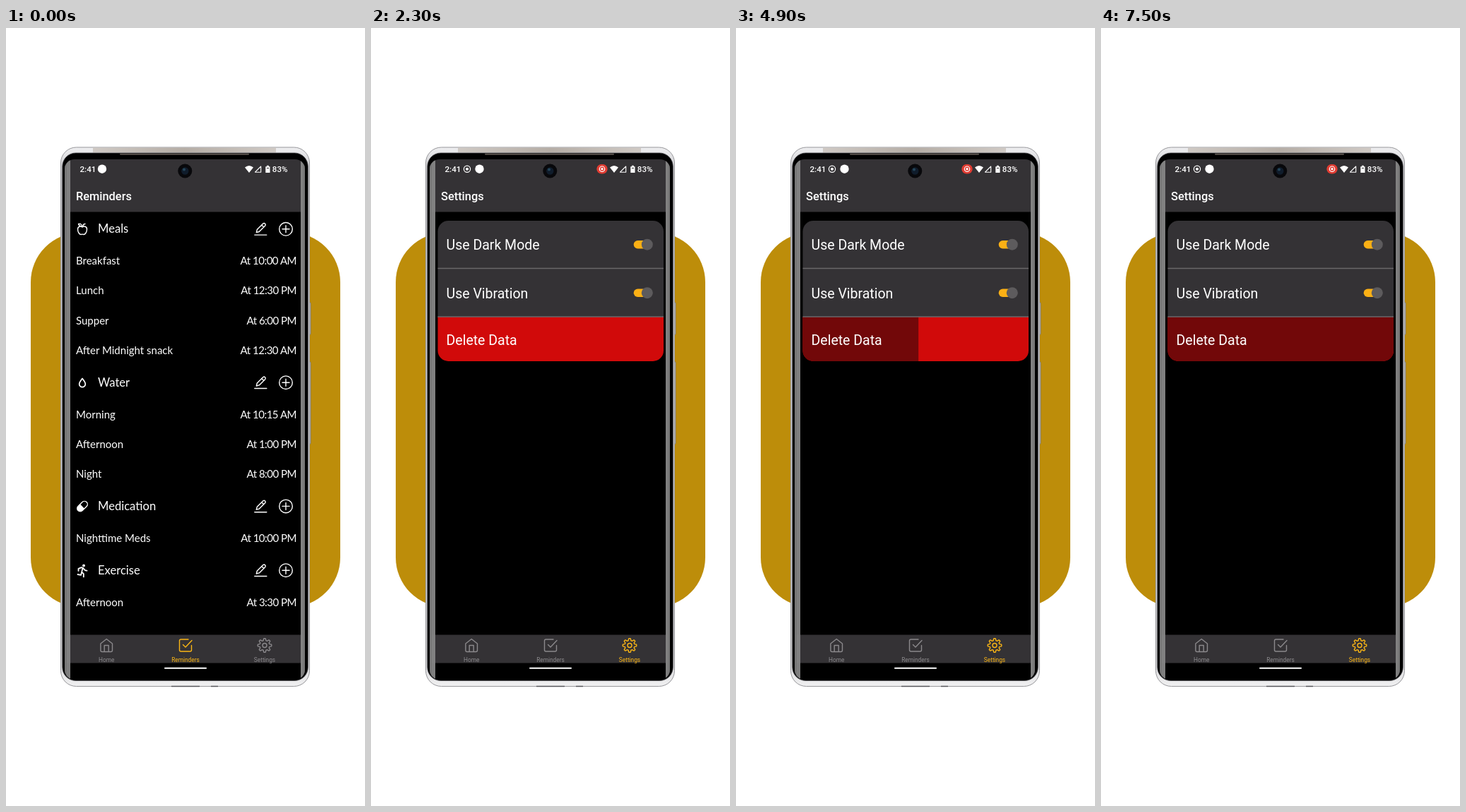
Recreate the animation shown at these times as an HTML page. Size 508 by 1102 pixels, loop 8000 ms.

```html
<!DOCTYPE html>
<html lang="en">
<head>
<meta charset="utf-8">
<title>Reminders app</title>
<style>
  html, body { margin: 0; width: 100%; height: 100%; overflow: hidden; background: #fff; }
  svg { display: block; width: 100%; height: 100%; }
  text { fill: #fff; }
  .list { font-family: Lato, sans-serif; font-size: 15px; }
  .list .head { font-size: 16.6px; }
  .list .time { text-anchor: end; letter-spacing: -.5px; }
  .status, .title, .rows, .tab { font-family: Roboto, sans-serif; }
  .status { font-size: 11.6px; font-weight: 500; }
  .title { font-size: 16.4px; font-weight: 500; }
  .rows { font-size: 19.5px; }
  .tab text { font-size: 8.3px; text-anchor: middle; fill: var(--tint); }
  .tab path, .tab circle { stroke: var(--tint); }
  .tab { --tint: #8b898c; }
  .tab.on { --tint: #fbb615; }
  .line { fill: none; stroke: #fff; stroke-width: 1.4; stroke-linecap: round; stroke-linejoin: round; }
  #reminders, #settings, #hold { animation: 8s step-end -5ms infinite; }
  #reminders { animation-name: leave; }
  #settings { animation-name: enter; }
  #hold { animation-name: fill; animation-timing-function: linear; }
  @keyframes leave { 0% { opacity: 1 } 16.25%, 100% { opacity: 0 } }
  @keyframes enter { 0% { opacity: 0 } 16.25%, 100% { opacity: 1 } }
  @keyframes fill {
    0% { transform: translateX(-323px); }
    37.5% { transform: translateX(-323px); animation-timing-function: steps(37, end); }
    83.75%, 100% { transform: translateX(2.6px); }
  }
</style>
</head>
<body>
<svg viewBox="0 0 508 1102">
  <defs>
    <linearGradient id="metal" x2="0" y2="1">
      <stop offset="0" stop-color="#eeeef0"/><stop offset=".05" stop-color="#c9c9cc"/>
      <stop offset=".94" stop-color="#d2d2d4"/><stop offset="1" stop-color="#f0f0f1"/>
    </linearGradient>
    <linearGradient id="band">
      <stop offset="0" stop-color="#cfc9c4"/><stop offset=".5" stop-color="#b5ada5"/><stop offset="1" stop-color="#cfc9c4"/>
    </linearGradient>
    <clipPath id="glass"><rect x="83" y="186" width="340" height="737" rx="14"/></clipPath>
    <clipPath id="card"><rect x="94.5" y="273" width="319.5" height="199" rx="15"/></clipPath>
  </defs>

  <rect x="35" y="290" width="438" height="530" rx="70" fill="#bd8d0a"/>

  <g fill="#c8c8cb" stroke="#77777a" stroke-width=".8">
    <rect x="426" y="388.500" width="5" height="46" rx="1.500"/>
    <rect x="426" y="472.500" width="5" height="117" rx="1.500"/>
  </g>
  <rect x="77.500" y="169" width="352" height="763.500" rx="22" fill="url(#metal)" stroke="#97979b"/>
  <rect x="123" y="169.500" width="259" height="7" fill="url(#band)"/>
  <path d="M234 932.500H274M290 932.500H300" stroke="#55555a" stroke-width="1.500"/>
  <rect x="79.800" y="177" width="347.500" height="747.500" rx="19" fill="#000" stroke="#4b4b4e" stroke-width=".8"/>
  <path d="M162 178.700H343" stroke="#5c5550" stroke-width="2" stroke-linecap="round"/>

  <g clip-path="url(#glass)">
    <rect x="83" y="186" width="340" height="74.500" fill="#343235"/>
    <rect x="83" y="859.500" width="340" height="40" fill="#343235"/>
  </g>
  <g id="reminders"></g>
  <g id="settings"></g>

  <g clip-path="url(#glass)" fill="#858585">
    <path d="M83 186H91V923H83ZM417 186H423V923H417Z" opacity=".96"/>
    <path d="M83 186H86V923H83ZM420.500 186H423V923H420.500Z" fill="#6f6f6f" opacity=".5"/>
  </g>
  <path d="M225 906.800H283" stroke="#fff" stroke-width="2" stroke-linecap="round"/>
  <circle cx="253.300" cy="202.500" r="10" fill="#08080b"/>
  <circle cx="253.300" cy="202.500" r="5.200" fill="#101c2b"/>
  <circle cx="252" cy="200.500" r="2" fill="#25465a"/>
</svg>

<script>
const text = (x, y, words, cls = '') => `<text x="${x}" y="${y}" class="${cls}">${words}</text>`;
const line = (d, extra = '') => `<path class="line" d="${d}" ${extra}/>`;
const at = (x, y, body) => `<g transform="translate(${x} ${y})">${body}</g>`;
const target = (x, y, r) => `<circle cx="${x}" cy="${y}" r="${r}" class="line" style="stroke-width:1.2"/>
  <circle cx="${x}" cy="${y}" r="${r * .45}" fill="#fff"/>`;

function statusBar(recording) {
  const dot = recording ? 153.5 : 136;
  return `<g class="status">${text(104.500, 203.500, '2:41')}${text(376.800, 203.500, '83%')}</g>
    ${recording ? target(136, 199.700, 4.600) +
      `<rect x="319.300" y="193" width="15.400" height="13.400" rx="6.700" fill="#e03c32"/>` + target(327, 199.700, 3.700) : ''}
    <circle cx="${dot}" cy="199.700" r="6.200" fill="#fff"/>
    <path fill="#fff" d="M338 197.500Q344 192.500 350 197.500L344 205ZM367.300 196.200H369V194.800H371.800V196.200H373.500V205H367.300Z"/>
    ${line('M352.500 204.200H360.700V196Z', 'style="stroke-width:1.1"')}
    <path d="M369 198.500H372" stroke="#343235"/>`;
}

// Eight rounded teeth around a ring
function gear() {
  const points = Array.from({ length: 97 }, (_, i) => {
    const a = i / 96 * 2 * Math.PI;
    const r = 8.4 + 1.4 * Math.max(-1, Math.min(1, 1.8 * Math.cos(8 * a)));
    return `${(r * Math.cos(a)).toFixed(2)} ${(r * Math.sin(a)).toFixed(2)}`;
  });
  return line(`M${points.join('L')}Z`) + '<circle class="line" r="3"/>';
}

const tabs = [
  ['Home', 142.2, line('M-8.300 -2.500L0 -9L8.300 -2.500V7Q8.300 9 6.300 9H-6.300Q-8.300 9 -8.300 7ZM-3 9V0H3V9')],
  ['Reminders', 254, line('M8.500 0V6.500Q8.500 8.500 6.500 8.500H-6.500Q-8.500 8.500 -8.500 6.500V-6.500Q-8.500 -8.500 -6.500 -8.500H4M-3.500 -1L0 2.500L9 -7')],
  ['Settings', 366, gear()]
];
const navBar = active => tabs.map(([name, x, icon]) =>
  `<g class="tab ${name === active ? 'on' : ''}">${at(x, 874.500, icon)}${text(x, 897.600, name)}</g>`).join('');

const page = (name, recording, body) =>
  statusBar(recording) + text(99, 244, name, 'title') + body + navBar(name);

const apple = line('M0 -3C-2.500 -5 -6.500 -4 -6.500 0C-6.500 4 -4 7.500 -2 7.500Q0 6.700 2 7.500C4 7.500 6.500 4 6.500 0C6.500 -4 2.500 -5 0 -3Q0 -6 -2.500 -7.500H-5.500Q-5 -4.500 -2 -4.500M1 -5Q1.500 -7.500 4 -7.500');
const drop = line('M0 -6C2 -3 4.300 -.5 4.300 2A4.300 4.300 0 0 1 -4.300 2C-4.300 -.5 -2 -3 0 -6Z', 'style="stroke-width:1.7"');
const pill = `<g transform="rotate(-45)"><rect x="-8.500" y="-4.300" width="17" height="8.600" rx="4.300" class="line"/>
  <path fill="#fff" d="M0 -4.300H-4.200A4.300 4.300 0 0 0 -4.200 4.300H0Z"/></g>`;
const runner = `<circle cx="2" cy="-7" r="1.900" fill="#fff"/>` +
  line('M-5.500 .5V-2.500L-1.300 -4.200L1.200 -3.600L3 -1Q4.500 .3 6.500 .3M.5 -3.500L-.8 2.200L1.800 4.700V9M-.8 2.200L-2 6.500L-6.500 5.600', 'style="stroke-width:1.8"');
const edit = line('M-8.500 8.300H8.500M-6 4.800L-5 .8L3.500 -7.700Q5 -8.800 6.300 -7.500T6.500 -4.800L-2 3.700ZM1.500 -5.500L4.500 -2.700');
const add = line('M-5 0H5M0 -5V5') + '<circle class="line" r="9.300"/>';

const groups = [
  ['Meals', apple, [['Breakfast', '10:00 AM'], ['Lunch', '12:30 PM'], ['Supper', '6:00 PM'], ['After Midnight snack', '12:30 AM']]],
  ['Water', drop, [['Morning', '10:15 AM'], ['Afternoon', '1:00 PM'], ['Night', '8:00 PM']]],
  ['Medication', pill, [['Nighttime Meds', '10:00 PM']]],
  ['Exercise', runner, [['Afternoon', '3:30 PM']]]
];

function reminderList() {
  let y = 284.5, out = '';
  for (const [name, icon, items] of groups) {
    out += at(108, y + .5, icon) + text(130, y + 5.700, name, 'head') + at(360.300, y + .3, edit) + at(396, y + .3, add);
    y += 45.4;
    for (const [label, time] of items) {
      out += text(99, y + 5.200, label) + text(411, y + 5.200, `At ${time}`, 'time');
      y += 42.2;
    }
    y += 45.4 - 42.2;
  }
  return `<g class="list">${out}</g>`;
}

const toggle = y => `<rect x="371.700" y="${y - 5.700}" width="25" height="11.400" rx="5.700" fill="#fbb015"/>
  <circle cx="390.800" cy="${y}" r="8" fill="#5d5b5d"/>`;

const settingsCard = `<g class="rows"><g clip-path="url(#card)">
    <rect x="94" y="273" width="321" height="137" fill="#343235"/>
    <rect x="94" y="409" width="321" height="63" fill="#d10a0a"/>
    <rect id="hold" x="84" y="409" width="330" height="63" fill="#720809"/>
    <path d="M94 340.500H415M94 409H415" stroke="#69676a" stroke-width="1.600"/></g>
  ${text(106.500, 314.200, 'Use Dark Mode')}${text(106.500, 382.900, 'Use Vibration')}${text(106.500, 449, 'Delete Data')}
  ${toggle(306.700)}${toggle(375.200)}</g>`;

document.getElementById('reminders').innerHTML = page('Reminders', false, reminderList());
document.getElementById('settings').innerHTML = page('Settings', true, settingsCard);
</script>
</body>
</html>
```
